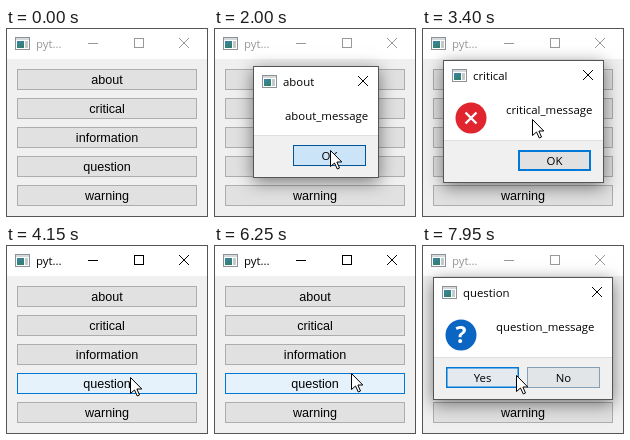
Animation of 202x189 px, one loop 8 s. Source, as an HTML page with a canvas:

```html
<!DOCTYPE html>
<html lang="en">
<head>
<meta charset="utf-8">
<title>Message boxes</title>
<style>
html, body { margin: 0; width: 100%; height: 100%; overflow: hidden; background: #f0f0f0; }
canvas { display: block; }
</style>
</head>
<body>
<canvas id="stage" width="202" height="189"></canvas>
<script>
const W = 202, H = 189, LOOP = 8000, STEP = 50;
const UI = '11.4px "Open Sans", "Noto Sans", sans-serif';
const LABEL = '12.6px "Liberation Sans", Arial, sans-serif';
const screen = document.getElementById('stage').getContext('2d');
const layer = document.createElement('canvas');
layer.width = W;
layer.height = H;
const sheet = layer.getContext('2d');
let g = screen;

const NORMAL = { fill: [225, 225, 225], edge: [173, 173, 173] };
const HOVER = { fill: [229, 241, 251], edge: [0, 120, 215] };
const PRESSED = { fill: [204, 228, 247], edge: [0, 84, 153] };

const button = (text, x, y, w, primary) => ({ text, x, y, w, h: 21, primary });
const mainButtons = ['about', 'critical', 'information', 'question', 'warning']
  .map((text, i) => button(text, 11, 41 + 29 * i, 180));

const dialogs = [
  { title: 'about', x: 39, y: 38, w: 126, h: 112, open: 800, close: 2000, textX: 32,
    buttons: [button('OK', 79, 117, 73, true)] },
  { title: 'critical', x: 21, y: 32, w: 161, h: 123, open: 2700, close: 3900, textX: 63,
    icon: '#e0252e', buttons: [button('OK', 96, 122, 73, true)] },
  { title: 'information', x: 7, y: 32, w: 189, h: 123, open: 4750, close: 6050, textX: 63,
    icon: '#0f78d0', buttons: [button('OK', 110, 122, 73, true)] },
  { title: 'question', x: 11, y: 32, w: 180, h: 123, open: 6800, close: 9000, textX: 63,
    icon: '#0a66c2', buttons: [button('Yes', 24, 122, 73, true), button('No', 105, 122, 73)] }
];

// start, end, target x, target y
const moves = [
  [350, 650, 84, 48], [1150, 1500, 116, 122], [2300, 2500, 105, 77],
  [3300, 3600, 124, 132], [4150, 4350, 128, 113], [5380, 5600, 137, 128],
  [6250, 6500, 137, 139], [7550, 7950, 94, 130]
];

const clamp = v => Math.max(0, Math.min(1, v));
const smooth = p => p * p * (3 - 2 * p);
const mix = (a, b, p) => `rgb(${a.map((v, i) => Math.round(v + (b[i] - v) * p))})`;

function pointer(t) {
  if (t < 350) return null;
  let x = 150, y = 140;
  for (const [from, to, tx, ty] of moves) {
    const p = smooth(clamp((t - from) / (to - from)));
    x += (tx - x) * p;
    y += (ty - y) * p;
  }
  return { x: Math.round(x), y: Math.round(y) };
}

const modalAt = t => dialogs.find(d => t > d.open && t <= d.close);

function isHit(b, owner, t) {
  const p = pointer(t);
  return p && modalAt(t) === owner &&
    p.x >= b.x && p.x < b.x + b.w && p.y >= b.y && p.y < b.y + b.h;
}

// Hover fades in and out over four steps.
function hoverLevel(b, owner, t) {
  let n = 0;
  for (let k = 0; k < 4; k++) if (isHit(b, owner, t - k * STEP)) n++;
  return n / 4;
}

function rect(x, y, w, h, color) {
  g.fillStyle = color;
  g.fillRect(x, y, w, h);
}

function frame(x, y, w, h, color, line = 1) {
  g.strokeStyle = color;
  g.lineWidth = line;
  g.strokeRect(x + line / 2, y + line / 2, w - line, h - line);
}

function text(s, x, y, font, color = '#000', align = 'left') {
  g.font = font;
  g.fillStyle = color;
  g.textAlign = align;
  g.fillText(s, x, y);
}

function cross(x, y, r, color, line = 1) {
  g.strokeStyle = color;
  g.lineWidth = line;
  g.beginPath();
  g.moveTo(x - r, y - r);
  g.lineTo(x + r, y + r);
  g.moveTo(x + r, y - r);
  g.lineTo(x - r, y + r);
  g.stroke();
}

function drawButton(b, owner, t) {
  const down = owner ? owner.close === t : dialogs.some(d => d.open === t);
  const pressed = down && isHit(b, owner, t);
  const level = hoverLevel(b, owner, t);
  const to = pressed ? PRESSED : HOVER;
  const p = pressed ? 1 : level;
  rect(b.x, b.y, b.w, b.h, mix(NORMAL.fill, to.fill, p));
  const edge = b.primary && !pressed ? mix(HOVER.edge, HOVER.edge, 1) : mix(NORMAL.edge, to.edge, p);
  frame(b.x, b.y, b.w, b.h, edge, b.primary ? 2 - level : 1);
  text(b.text, b.x + b.w / 2, b.y + (owner ? 14.5 : 15), owner ? UI : LABEL, '#000', 'center');
}

function appIcon(x, y) {
  rect(x, y, 15, 13, '#8d9296');
  rect(x + 1, y + 1, 13, 2, '#d5d9dc');
  rect(x + 1, y + 3, 13, 9, '#fff');
  const fill = g.createLinearGradient(x, y + 3, x + 6, y + 12);
  fill.addColorStop(0, '#3c87b4');
  fill.addColorStop(1, '#2f8068');
  g.fillStyle = fill;
  g.fillRect(x + 2, y + 4, 7, 7);
  rect(x + 10, y + 4, 3, 7, '#c4c9cd');
}

function drawMain(t) {
  const active = t > 2000 && !modalAt(t);
  const ink = active ? '#000' : '#999';
  rect(0, 0, W, H, '#f0f0f0');
  rect(0, 0, W, 31, '#fff');
  frame(0, 0, W, H, '#555');
  appIcon(9, 9);
  text('pyt...', 30, 19.5, UI, ink);
  rect(82, 15, 10, 1, ink);
  frame(128, 10, 10, 10, ink);
  cross(178, 15, 5, ink);
  for (const b of mainButtons) drawButton(b, undefined, t);
}

function statusIcon(d) {
  const x = d.x + 28, y = 90;
  g.fillStyle = d.icon;
  g.beginPath();
  g.arc(x, y, 15.5, 0, Math.PI * 2);
  g.fill();
  if (d.title === 'critical') cross(x, y, 5.5, '#fff', 2.4);
  else if (d.title === 'question') text('?', x, y + 8, 'bold 23px "Open Sans", sans-serif', '#fff', 'center');
  else {
    rect(x - 1, y - 3, 2.2, 11, '#fff');
    rect(x - 1.2, y - 8, 2.6, 2.6, '#fff');
  }
}

function drawDialog(d, t) {
  const opening = clamp((t - d.open) / 150);
  const closing = clamp((t - d.close) / 150);
  const shown = (1 - (1 - opening) ** 2) * (1 - closing);
  if (!shown) return;

  g = sheet;
  g.clearRect(0, 0, W, H);
  g.save();
  g.shadowColor = 'rgba(0,0,0,.5)';
  g.shadowBlur = 16;
  g.shadowOffsetY = 4;
  rect(d.x, d.y, d.w, d.h, '#fff');
  g.restore();
  const foot = d.buttons[0].y - 10;
  rect(d.x, foot, d.w, d.y + d.h - foot, '#f0f0f0');
  rect(d.x, foot, d.w, 1, '#dfdfdf');
  frame(d.x, d.y, d.w, d.h, '#555');
  appIcon(d.x + 9, d.y + 9);
  text(d.title, d.x + 30, d.y + 19.5, UI);
  cross(d.x + d.w - 16, d.y + 15, 5, '#000');
  if (d.icon) statusIcon(d);
  text(d.title + '_message', d.x + d.textX, d.y + 53.5, UI);
  for (const b of d.buttons) drawButton(b, d, t);
  g = screen;

  const cx = d.x + d.w / 2, cy = d.y + d.h / 2, s = 0.92 + 0.08 * shown;
  g.save();
  g.globalAlpha = shown;
  g.translate(cx, cy);
  g.scale(s, s);
  g.drawImage(layer, -cx, -cy);
  g.restore();
}

function drawPointer({ x, y }) {
  const arrow = [[0, 0], [0, 16], [4, 12.5], [6.8, 18.5], [9, 17.5], [6.4, 11.5], [11.3, 11.5]];
  g.beginPath();
  for (const [dx, dy] of arrow) g.lineTo(x + 0.5 + dx, y + 0.5 + dy);
  g.closePath();
  g.fillStyle = '#fff';
  g.fill();
  g.strokeStyle = '#000';
  g.lineWidth = 1;
  g.stroke();
}

function draw(t) {
  drawMain(t);
  for (const d of dialogs) drawDialog(d, t);
  const p = pointer(t);
  if (p) drawPointer(p);
}

const start = performance.now();
function tick() {
  const t = (performance.now() - start) % LOOP;
  draw(Math.floor(t / STEP) * STEP);
  requestAnimationFrame(tick);
}
tick();
</script>
</body>
</html>
```
